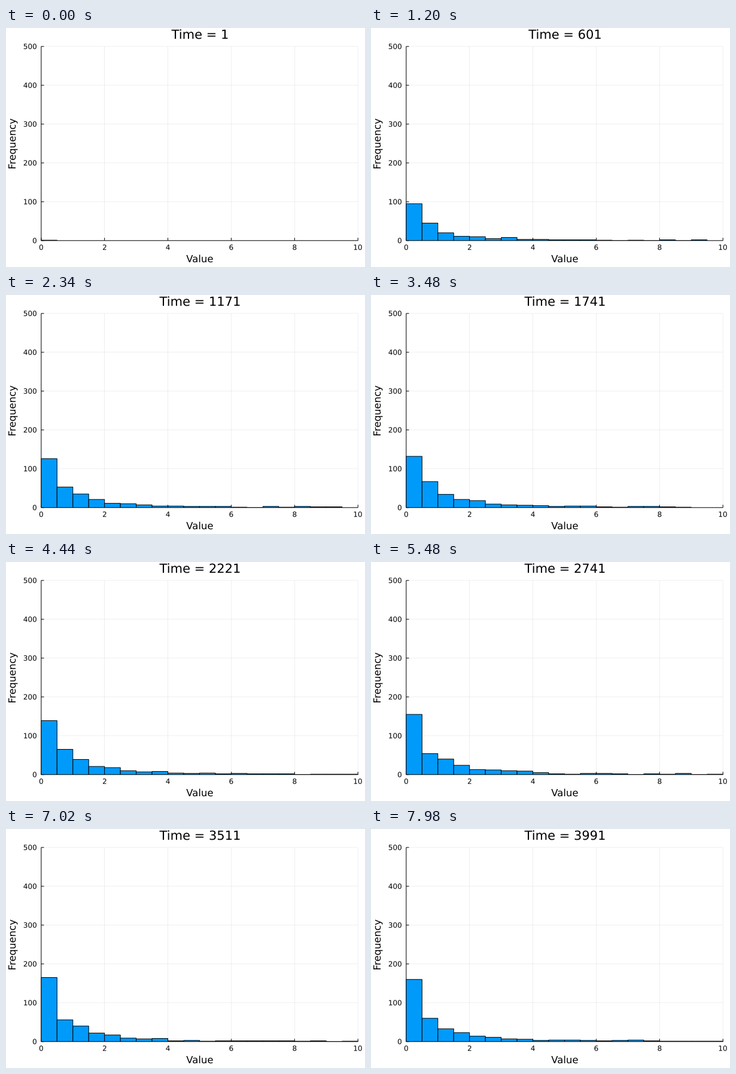
These frames come from a looping animation (600 by 400 pixels, 8 s). A matplotlib script:

```python
import numpy as np
import matplotlib.pyplot as plt
from matplotlib.animation import FuncAnimation
from matplotlib.patches import PathPatch, Rectangle
from matplotlib.textpath import TextPath
from matplotlib.transforms import Affine2D

plt.rcParams["font.family"] = "DejaVu Sans"

W, H, DPI = 600, 400, 100
FRAMES, STEP = 400, 20
LEFT, RIGHT, TOP, BOTTOM = 58.82, 588.19, 30.87, 355.8
MID_X, MID_Y = (LEFT + RIGHT) / 2, (TOP + BOTTOM) / 2
BINS = 20
PIXEL = 72 / DPI
TITLE, GUIDE, TICK = 21, 16.5, 12


def px(value):
    return LEFT + (RIGHT - LEFT) * value / 10


def py(count):
    return BOTTOM - (BOTTOM - TOP) * count / 500


def make_history():
    """Counts per frame: a saturating power-law tail with slow random drift."""
    rng = np.random.default_rng(7)
    growth = 1 - np.exp(-np.arange(FRAMES) / 60)
    profile = 150 / (1 + 0.55 * np.arange(BINS)) ** 2
    mean = np.outer(growth, profile)
    mean[:, 0] += growth[0] == 0  # one item is there from the start

    memory = np.exp(-1 / 40)
    kicks = rng.normal(size=(FRAMES, BINS)) * np.sqrt(1 - memory ** 2)
    drift = np.zeros((FRAMES, BINS))
    for i in range(1, FRAMES):
        drift[i] = memory * drift[i - 1] + kicks[i]
    counts = mean + 0.7 * np.sqrt(mean) * drift
    return np.rint(np.clip(counts, 0, None)).astype(int)


def text_path(x, y, text, size, align=0.5, angle=0):
    """Outline of text whose baseline is at y, in pixels with y downwards."""
    path = TextPath((0, 0), text, size=size)
    box = path.get_extents()
    shift = -(box.x0 + align * box.width)
    place = Affine2D().translate(shift, 0).scale(1, -1)
    return place.rotate_deg(-angle).translate(x, y).transform_path(path)


fig = plt.figure(figsize=(W / DPI, H / DPI), dpi=DPI, facecolor="white")
ax = fig.add_axes([0, 0, 1, 1])
ax.set_xlim(0, W)
ax.set_ylim(H, 0)
ax.axis("off")


def line(x, y, width=1, **style):
    ax.plot(x, y, color="black", lw=width * PIXEL, snap=False,
            solid_capstyle="butt", **style)


def label(*args, **kwargs):
    patch = PathPatch(text_path(*args, **kwargs), fc="black", lw=0, snap=False)
    return ax.add_patch(patch)


grid = dict(width=0.6, alpha=0.1, zorder=1)
for v in range(0, 11, 2):
    x = px(v)
    line([x, x], [TOP, BOTTOM], **grid)
    line([x, x], [BOTTOM, BOTTOM - 4.7])
    label(x, 371.3, str(v), TICK)
for c in range(0, 501, 100):
    y = py(c)
    line([LEFT, RIGHT], [y, y], **grid)
    line([LEFT, LEFT + 4.7], [y, y])
    label(50.9, y + 4.3, str(c), TICK, align=1)
line([LEFT, RIGHT], [BOTTOM, BOTTOM])
line([LEFT, LEFT], [TOP, BOTTOM])

label(MID_X, 392, "Value", GUIDE)
label(16, MID_Y, "Frequency", GUIDE, angle=90)
title = label(MID_X, 18.1, "Time", TITLE)

plot_area = Rectangle((58, 30), 531, 326, transform=ax.transData)
bars = []
for b in range(BINS):
    bar = Rectangle((px(b / 2), BOTTOM), px(0.5) - px(0), 0, facecolor="#009afa",
                    edgecolor="black", lw=PIXEL, snap=False, zorder=3)
    ax.add_patch(bar)
    bar.set_clip_path(plot_area)
    bars.append(bar)

history = make_history()


def update(i):
    title.set_path(text_path(MID_X, 18.1, f"Time = {1 + 10 * i}", TITLE))
    last = np.flatnonzero(history[i]).max(initial=0)
    for b, bar in enumerate(bars):
        bar.set_height(py(history[i, b]) - BOTTOM)
        bar.set_visible(b <= last)
    return [title, *bars]


anim = FuncAnimation(fig, update, frames=FRAMES, interval=STEP,
                     repeat=True, repeat_delay=0)
plt.show()
```
